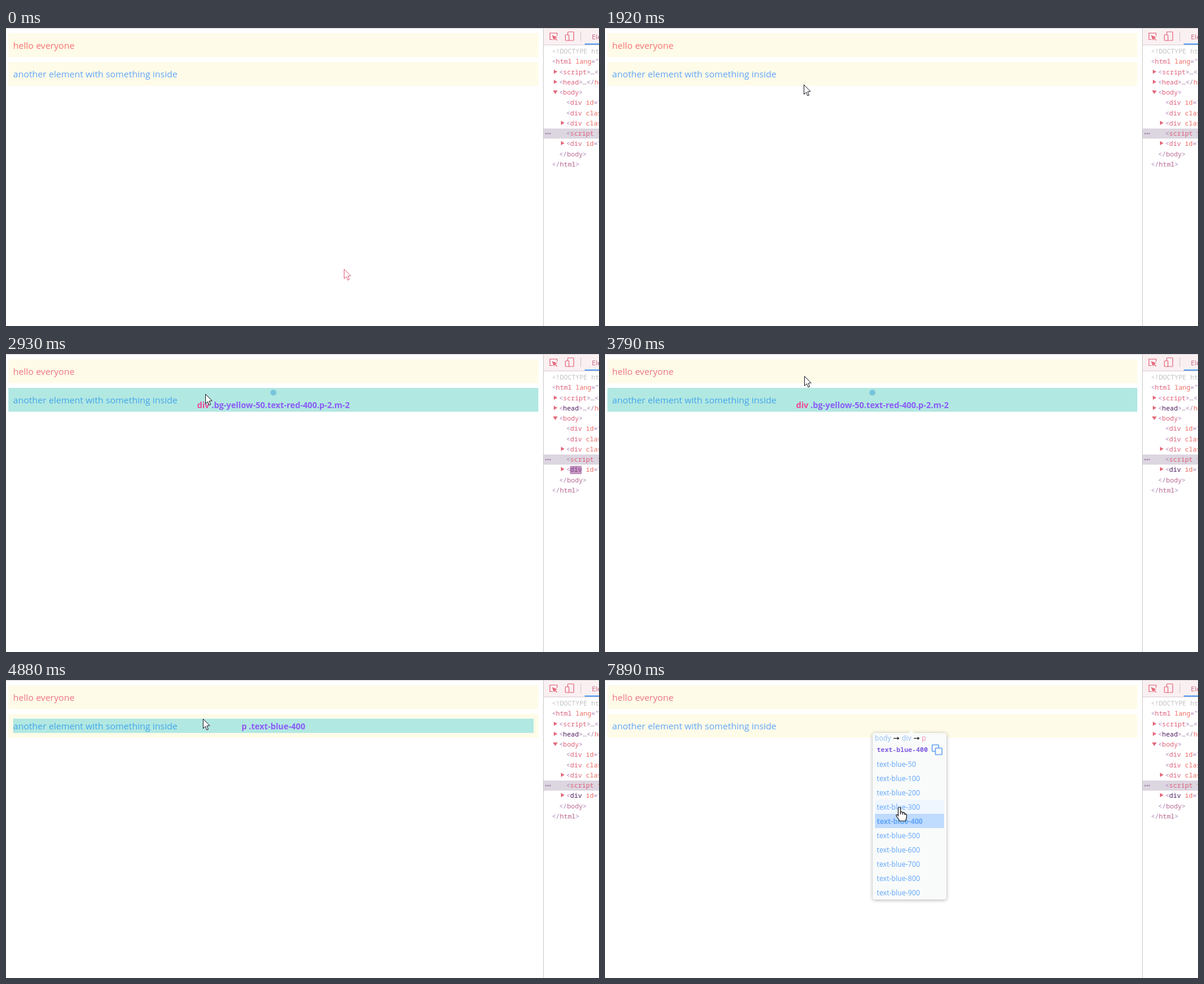
Animation, 997 px wide and 501 px high, one loop 8000 ms. Source, as an HTML page with a canvas:

```html
<!DOCTYPE html>
<html lang="en">
<head>
<meta charset="utf-8">
<title>Element picker</title>
<style>
html, body { margin: 0; width: 100%; height: 100%; overflow: hidden; background: #fff; }
canvas { display: block; }
</style>
</head>
<body>
<canvas id="stage" width="997" height="501"></canvas>
<script>
const ctx = document.getElementById('stage').getContext('2d');
const LOOP = 8000;
const SANS = '"Open Sans", "Noto Sans", sans-serif';
const MONO = '"Noto Sans Mono", "DejaVu Sans Mono", monospace';
const VIOLET = '#8b5cf6', BLUE = '#60a5fa', RED = '#f87171', ICON = '#e5687a';

// start, end, steps, target x, target y
const START = [568, 405];
const MOVES = [
  [930, 1690, 12, 346, 124],
  [1780, 1920, 3, 334, 95],
  [2000, 2160, 3, 334, 85],
  [2630, 3080, 7, 335, 60],
  [3230, 3790, 8, 335, 37],
  [3860, 4030, 3, 336, 32],
  [4180, 4180, 1, 337, 32],
  [4420, 4880, 7, 331, 65],
  [5180, 5430, 4, 331, 73],
  [6740, 7520, 11, 492, 190],
  [7590, 7890, 5, 495, 214]
];

const CLICKS = [[530, 660], [5740, 5900]];
const OPEN = 5900;

const BOXES = {
  first: { rect: [4, 9, 891, 40], tag: 'div', cls: '.bg-yellow-50.text-red-400.p-2.m-2', badge: true },
  second: { rect: [4, 57, 891, 40], tag: 'div', cls: '.bg-yellow-50.text-red-400.p-2.m-2', badge: true },
  para: { rect: [12, 65, 875, 24], tag: 'p', cls: '.text-blue-400' }
};
const HOVERS = [
  [2000, 'second'], [2080, 'para'], [2850, 'second'], [3860, 'first'],
  [4650, 'second'], [4800, 'para'], [OPEN, null]
];

const FLASHES = [[2000, 470], [2630, 450], [3230, 450], [OPEN, 840]];

// x, text, disclosure arrow
const TREE = [
  [918, '<!DOCTYPE html>'],
  [918, '<html lang="en">'],
  [930, '<script>…</' + 'script>', 'right'],
  [930, '<head>…</head>', 'right'],
  [930, '<body>', 'down'],
  [942, '<div id="app">'],
  [942, '<div class="">'],
  [942, '<div class="">', 'right'],
  [942, '<script type="">'],
  [942, '<div id="">', 'right'],
  [930, '</body>'],
  [918, '</html>']
];

const SHADES = ['50', ...Array.from({ length: 9 }, (_, i) => String((i + 1) * 100))];

function rect(x, y, w, h, color) {
  ctx.fillStyle = color;
  ctx.fillRect(x, y, w, h);
}

function text(str, x, y, size, color, weight = 400, family = SANS) {
  ctx.font = `${weight} ${size}px ${family}`;
  ctx.fillStyle = color;
  ctx.fillText(str, x, y);
  return ctx.measureText(str).width;
}

function poly(points, fill, stroke, width = 1, close = true) {
  ctx.beginPath();
  points.forEach(([x, y]) => ctx.lineTo(x, y));
  if (close) ctx.closePath();
  if (fill) { ctx.fillStyle = fill; ctx.fill(); }
  if (stroke) { ctx.strokeStyle = stroke; ctx.lineWidth = width; ctx.stroke(); }
}

function disc(x, y, r, color) {
  ctx.fillStyle = color;
  ctx.beginPath();
  ctx.arc(x, y, r, 0, Math.PI * 2);
  ctx.fill();
}

function outline(x, y, w, h, r, color, width, fill) {
  ctx.beginPath();
  ctx.roundRect(x, y, w, h, r);
  if (fill) { ctx.fillStyle = fill; ctx.fill(); }
  ctx.strokeStyle = color;
  ctx.lineWidth = width;
  ctx.stroke();
}

function pointerAt(t) {
  let [x, y] = START;
  for (const [from, to, steps, tx, ty] of MOVES) {
    if (t < from) break;
    const step = steps > 1 ? Math.floor((t - from) * (steps - 1) / (to - from) + 1e-6) + 1 : 1;
    let p = Math.min(1, step / steps);
    if (steps > 10) p = (p + p * p * (3 - 2 * p)) / 2;
    x += (tx - x) * p;
    y += (ty - y) * p;
  }
  return [Math.round(x), Math.round(y)];
}

function hoverAt(t) {
  let name = null;
  for (const [from, value] of HOVERS) if (t >= from) name = value;
  return BOXES[name];
}

function flashAt(t, list) {
  let a = 0;
  for (const [from, length] of list) {
    if (t >= from) a = 1 - Math.max(0, t - from - 160) / (length - 160);
  }
  return Math.max(0, a);
}

function drawPage(t) {
  rect(0, 0, 997, 501, '#fff');
  rect(4, 9, 891, 40, '#fefbe8');
  rect(4, 57, 891, 40, '#fefbe8');
  const box = hoverAt(t);
  if (box) rect(...box.rect, '#b2e8e2');
  text('hello everyone', 12, 35, 15.1, t < 2000 ? RED : '#f07484');
  text('another element with something inside', 12, 83, 15.1, box ? '#42a5ea' : BLUE);
  if (box) drawLabel(box, t);
}

function drawLabel({ rect: [, y, , h], tag, cls, badge }, t) {
  const size = 13.85;
  const base = y + h / 2 + (badge ? 14 : 6);
  const pink = tag === 'div' ? '#ec4899' : t < 4420 ? '#e8648b' : '#935ae8';
  ctx.font = `700 ${size}px ${SANS}`;
  const x = 449.5 - ctx.measureText(tag + ' ' + cls).width / 2;
  const used = text(tag + ' ', x, base, size, pink, 700);
  text(cls, x + used, base, size, VIOLET, 700);
  if (badge) disc(449.5, y + 8, 5, '#78c4dc');
}

function drawToolbar() {
  rect(903, 0, 94, 28, '#faf0f2');
  rect(0, 0, 997, 1, '#d6d3d6');
  rect(903, 28, 94, 1, '#dacdd3');
  rect(903, 1, 1, 500, '#cbc9cb');
  // element picker
  poly([[926.5, 13], [926.5, 8.5], [914.5, 8.5], [914.5, 19.5], [919, 19.5]], null, ICON, 1.2, false);
  poly([[918, 12], [927, 15.5], [923.6, 16.8], [927, 20.2], [925.9, 21.3], [922.6, 18], [921.2, 21]], ICON);
  // device switch
  outline(944.5, 6.5, 10, 14.5, 1, ICON, 1.2);
  outline(940.5, 11.5, 6, 9.5, 1, ICON, 1.2, '#faf0f2');
  rect(966, 6, 1, 16, '#d3c5cc');
  text('Elements', 985, 19, 11.6, '#c2607c');
  rect(973, 26, 24, 2, '#539df2');
}

function drawMarkup(str, x, y, dark) {
  if (str.startsWith('<!')) {
    text(str, x, y, 11, '#c3c1c3', 400, MONO);
    return;
  }
  let first = true;
  const closing = str.startsWith('</');
  for (const part of str.match(/\w+|\W+/g)) {
    let color = '#a97fb6';
    if (/\w/.test(part)) {
      color = closing ? '#b9688f' : first ? (dark ? '#4c1d5f' : '#dd607a') : '#ee6b62';
      first = false;
    } else if (part === '>…</') {
      color = '#a27aa6';
    }
    x += text(part, x, y, 11, color, 400, MONO);
  }
}

function drawFlash(word, x, y, w, a) {
  if (!a) return;
  ctx.globalAlpha = a;
  ctx.fillStyle = '#8b2f86';
  ctx.beginPath();
  ctx.roundRect(x, y, w, 14, 2);
  ctx.fill();
  ctx.globalAlpha = a * a;
  text(word, x + 0.6, y + 11, 11, '#f3d9ee', 400, MONO);
  ctx.globalAlpha = 1;
}

function drawTree(t) {
  rect(904, 169, 93, 17, '#dcd6e0');
  for (const x of [908, 911.5, 915]) disc(x, 177.5, 1.2, '#a183a8');
  TREE.forEach(([x, str, arrow], i) => {
    const y = Math.round(43 + i * 17.27);
    drawMarkup(str, x, y, t >= 2000 && (i === 3 || i === 9));
    const ax = x - 9, ay = y - 4;
    if (arrow === 'right') poly([[ax, ay - 4], [ax + 6, ay - 0.5], [ax, ay + 3]], ICON);
    if (arrow === 'down') poly([[ax - 1.5, ay - 3], [ax + 6.5, ay - 3], [ax + 2.5, ay + 3]], ICON);
  });
  drawFlash('head', 936, 84, 26, flashAt(t, FLASHES.slice(0, 1)));
  drawFlash('div', 948, 188, 20, flashAt(t, FLASHES));
}

function drawArrow(x) {
  rect(x, 97.5, 9, 1.2, '#222');
  poly([[x + 6.5, 95.5], [x + 10, 98.1], [x + 6.5, 100.7]], '#222');
}

function drawPopup(t, mouse) {
  const bg = '#f9fbfa';
  ctx.save();
  ctx.shadowColor = 'rgba(0,0,0,.32)';
  ctx.shadowBlur = 6;
  ctx.shadowOffsetY = 1;
  ctx.fillStyle = bg;
  ctx.beginPath();
  ctx.roundRect(450, 89, 124, 280, 4);
  ctx.fill();
  ctx.restore();
  poly([[509, 90], [515, 84.5], [521, 90]], bg);

  text('body', 453.5, 102, 11.75, '#93bdf8');
  drawArrow(485);
  text('div', 499, 102, 11.75, '#93bdf8');
  drawArrow(519);
  text('p', 532.5, 102, 11.75, '#f28ba6');

  text('text-blue-400', 457, 121, 11, '#7e5ce0', 700, MONO);
  const blink = Math.floor((t - 5990) / 530);
  if (blink % 2 === 0) rect(543, 111, 1, 12, '#222');
  outline(550, 109, 11, 11, 1, '#6ea4f5', 1.7);
  outline(555.5, 114.5, 11, 11, 1, '#6ea4f5', 1.7, bg);

  const [mx, my] = mouse;
  const hovered = mx > 453 && mx < 570 ? Math.floor((my - 129) / 24) : -1;
  SHADES.forEach((shade, i) => {
    const y = 129 + i * 24, active = shade === '400';
    if (active || i === hovered) rect(454, y, 116, 24, active ? '#bfdbfe' : '#eff6ff');
    text('text-blue-' + shade, 457, y + 17, 11.75, BLUE, active ? 700 : 400);
  });
}

function drawPointer(x, y, color) {
  ctx.save();
  ctx.translate(x + 0.5, y + 0.5);
  ctx.lineJoin = 'miter';
  poly([[0, 0], [0, 16], [3.7, 12.6], [6.2, 18.4], [8.6, 17.4], [6.2, 11.6], [11, 11.2]], '#fff', color);
  ctx.restore();
}

function drawHand(x, y) {
  ctx.save();
  ctx.translate(x, y);
  const shape = new Path2D('M-2 14V2Q-2 0 0 0Q2 0 2 2V8Q3 7 5 8Q5.5 8.5 5.5 9Q7 8 8.5 9.5Q9 10 9 11' +
    'Q11 10.5 12 12.5V17Q11.5 20 10 23H0Q-1 20 -5 15Q-6 12.5 -4 12.5Q-2.5 13 -2 14Z');
  ctx.fillStyle = '#fff';
  ctx.strokeStyle = '#111';
  ctx.lineWidth = 1.2;
  ctx.fill(shape);
  ctx.stroke(shape);
  ctx.stroke(new Path2D('M2 8V12M5.5 9V12.5M9 11V13'));
  ctx.restore();
}

function draw(t) {
  const mouse = pointerAt(t);
  const [x, y] = mouse;
  drawPage(t);
  drawToolbar();
  drawTree(t);
  if (t >= OPEN) drawPopup(t, mouse);
  if (CLICKS.some(([from, to]) => t >= from && t < to)) disc(x, y, 12, 'rgba(255,255,0,.47)');
  if (t >= OPEN && x > 453 && y > 129) drawHand(x, y);
  else drawPointer(x, y, t < 930 ? '#df5f78' : '#1c1a26');
}

function frame() {
  draw(performance.now() % LOOP);
  requestAnimationFrame(frame);
}
frame();
</script>
</body>
</html>
```
